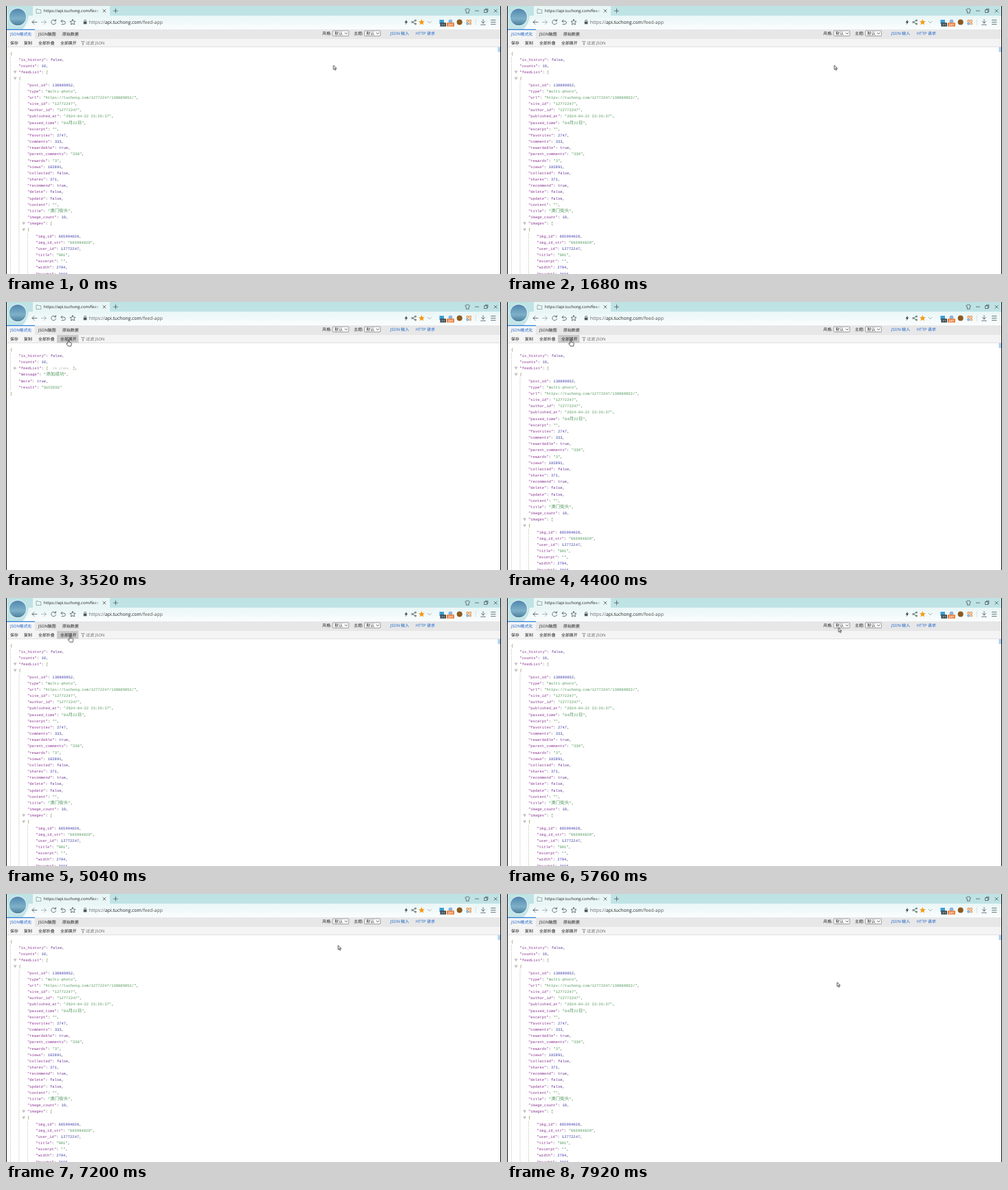
These frames come from a looping animation (720 px wide and 390 px high, 8000 ms). An HTML page:

```html
<!DOCTYPE html>
<html>
<head>
<meta charset="utf-8">
<style>
html, body { margin: 0; width: 100%; height: 100%; overflow: hidden; background: #fff; }
svg { display: block; width: 720px; height: 390px; }
text { font: 5.9px "Open Sans", "Noto Sans CJK SC", sans-serif; fill: #222; text-rendering: geometricPrecision; white-space: pre; }
.url { font-size: 6.8px; }
.blue { fill: #1763c6; }
.line { fill: none; stroke: #4a5658; stroke-width: .8; stroke-linecap: round; stroke-linejoin: round; }
.badge { font-size: 4.4px; font-weight: 600; fill: #fff; text-anchor: middle; }
.json text { font: 5.5px "Liberation Mono", "Noto Sans CJK SC", monospace; fill: #444; }
.json .cjk { font-size: 6.6px; }
.key { fill: #8b3591; }
.str { fill: #4f9659; }
.num { fill: #3d3da8; }
.bool { fill: #682e94; }
.brace { fill: #747a35; }
.guide { stroke: #b9b9b0; stroke-width: .7; stroke-dasharray: 1.5 1; }
.fold { fill: #c8c8c8; stroke: #aaa; stroke-width: .4; }

.full, .short, .hover1, .hover2, .arrow, .hand, .cursor { animation: 8s step-end infinite; }
.full { animation-name: full; }
.short { animation-name: short; }
.hover1 { animation-name: hover1; }
.hover2 { animation-name: hover2; }
.arrow { animation-name: arrow; }
.hand { animation-name: hand; }
.cursor { animation-name: move; animation-timing-function: linear; }
@keyframes full { 0%, 52% { visibility: visible } 33% { visibility: hidden } }
@keyframes short { 0%, 52% { visibility: hidden } 33% { visibility: visible } }
@keyframes hover1 { 0%, 37% { visibility: hidden } 27% { visibility: visible } }
@keyframes hover2 { 0%, 64% { visibility: hidden } 37% { visibility: visible } }
@keyframes arrow { 0%, 64% { visibility: visible } 27% { visibility: hidden } }
@keyframes hand { 0%, 64% { visibility: hidden } 27% { visibility: visible } }
@keyframes move {
  0%, 21% { transform: translate(476.3px, 86.3px) }
  23% { transform: translate(440px, 82px) }
  26% { transform: translate(130px, 60px) }
  28%, 35% { transform: translate(53px, 50.3px) }
  40%, 44% { transform: translate(91px, 55px) }
  52%, 63% { transform: translate(93px, 55px) }
  66% { transform: translate(220px, 56px) }
  69% { transform: translate(440px, 46px) }
  71%, 73% { transform: translate(482.3px, 43.3px) }
  80%, 86% { transform: translate(483.5px, 45px) }
  91% { transform: translate(483px, 82px) }
  97%, 100% { transform: translate(480.2px, 128.4px) }
}
</style>
</head>
<body>
<svg viewBox="0 0 720 390">
  <defs>
    <linearGradient id="bar" x2="0" y2="1">
      <stop stop-color="#e9f6f6"/><stop offset="1" stop-color="#fbfdfd"/>
    </linearGradient>
    <linearGradient id="sky" x2="0" y2="1">
      <stop stop-color="#4f87ae"/><stop offset=".6" stop-color="#7fb0c9"/><stop offset="1" stop-color="#4b7f9c"/>
    </linearGradient>
    <linearGradient id="fade">
      <stop stop-color="#e9f6f6" stop-opacity="0"/><stop offset="1" stop-color="#e9f6f6"/>
    </linearGradient>
  </defs>

  <!-- window and tabs -->
  <path fill="#fff" d="M0 0h720v390H0z"/>
  <path fill="#bfe3e5" d="M0 0h720v14H0z"/>
  <path fill="url(#bar)" d="M0 14h720v20H0z"/>
  <path fill="#e9f6f6" d="M39 0h112v14H39z"/>
  <path fill="#c4e5e7" d="M0 14h33q-1 12-9 20H0z"/>
  <circle cx="17" cy="16" r="13.2" fill="#e3f3f6"/>
  <circle cx="17" cy="16" r="12.2" fill="url(#sky)"/>
  <path class="line" style="stroke:#8b9899" d="M44.500 4.500h2.300l.8 1h3.200v5h-6.300z"/>
  <text x="55" y="9.300">https://api.tuchong.com/feed-</text>
  <path fill="url(#fade)" d="M127 2h9v10h-9z"/><path fill="#e9f6f6" d="M136 2h4v10h-4z"/>
  <path class="line" d="M141 5l4 4m0-4l-4 4M156.500 7h6m-3-3v6"/>
  <path class="line" d="M669 4.500l1.500-.7q.8 1 1.600 0l1.500.7 1 1.500-1.400.7v3.500h-3.800v-3.500l-1.400-.7zM682.500 7h5M696 5.500h3.700v4H696zM697.200 5.500v-1.300h3.700v4h-1.200M710 5l4.200 4.200m0-4.200l-4.200 4.200"/>

  <!-- address row -->
  <path class="line" d="M45 23.500h-7l3-3m-3 3l3 3"/>
  <path class="line" style="stroke:#9aa5a6" d="M51.500 23.500h7l-3-3m3 3l-3 3"/>
  <path class="line" d="M72 21.500a3.400 3.400 0 1 0 .5 3M72.500 19.500v2.300h-2.300M80 22h4a2.200 2.200 0 0 1 0 4.600h-3M82 20l-2 2 2 2"/>
  <path class="line" d="M97 19.500l1.200 2.600 2.800.3-2.100 1.900.6 2.800-2.500-1.400-2.500 1.400.6-2.800-2.100-1.900 2.800-.3z"/>
  <path class="line" d="M113.700 23v-1.300a1.400 1.400 0 0 1 2.800 0V23"/>
  <path fill="#4a5658" d="M112.800 22.700h4.600v3.600h-4.600z"/>
  <text class="url" x="120.800" y="25.900"><tspan fill="#666">https://</tspan>api.tuchong.com<tspan fill="#555">/feed-app</tspan></text>
  <path fill="#333c3e" d="M583 19.800l-3.300 4.200h2l-.9 3.200 3.600-4.400h-2.100z"/>
  <path class="line" d="M595 21.300l-4 2.200 4 2.200"/>
  <g fill="#fff" class="line"><circle cx="595.500" cy="21" r="1"/><circle cx="590.700" cy="23.500" r="1"/><circle cx="595.500" cy="26" r="1"/></g>
  <path fill="#f59a1b" d="M604.500 19l1.300 2.900 3.100.3-2.300 2.100.7 3.100-2.800-1.600-2.800 1.600.7-3.100-2.300-2.100 3.100-.3z"/>
  <path class="line" style="stroke:#8b9899" d="M613.300 22.300l2.500 2.500 2.500-2.500"/>
  <path fill="#3d9fd2" d="M630.500 20h6.500v6h-6.500z"/>
  <path fill="#37474f" d="M631.500 24.300h8.500v5.500h-8.500z"/><text class="badge" x="635.800" y="28.700">11</text>
  <circle cx="646.500" cy="22.500" r="3" fill="#8eb4e4"/>
  <path fill="#ed7b35" d="M641 24.300h11v5.500h-11z"/><text class="badge" x="646.500" y="28.700">OFF</text>
  <circle cx="659.700" cy="23.500" r="4" fill="#8b5a22"/>
  <g fill="none" stroke-width="1"><path stroke="#f08a3c" d="M670 20.500h2.400v2.400H670zM674 24.500h2.400v2.400H674z"/><path stroke="#4a95e6" d="M670 24.500h2.400v2.400H670z"/><path stroke="#f08a3c" d="M674 20.500h2.400v2.400H674z"/></g>
  <path stroke="#cbd6d7" stroke-width=".7" d="M683.500 19v9"/>
  <path class="line" d="M694 19.500v5.500m-2.500-2.500l2.500 2.500 2.500-2.500M690.700 27.300h6.600M705.500 20.500h6.500m-6.500 3h6.500m-6.500 3h6.500"/>

  <!-- viewer toolbar -->
  <path fill="#e7e7e8" d="M0 34h720v14H0z"/>
  <path fill="#f4f4f5" d="M1 34h41v14H1zM0 48h720v11.500H0z"/>
  <path fill="#2d7fe0" d="M1 33.700h41v1.200H1z"/>
  <path fill="#d8d8da" d="M0 59.300h720v.7H0z"/>
  <path class="hover1" fill="#cacacb" d="M42 48h32v11.300H42z"/>
  <path class="hover2" fill="#cacacb" d="M74 48h31.500v11.300H74z"/>
  <text class="blue" x="6" y="43.300">JSON格式化</text>
  <text x="47" y="43.300">JSON脑图</text>
  <text x="82" y="43.300">原始数据</text>
  <text x="460" y="42.300">风格:</text>
  <text x="506" y="42.300">主题:</text>
  <g id="pick">
    <rect x="475.400" y="36" width="23.200" height="7.600" rx=".8" fill="#fff" stroke="#777" stroke-width=".7"/>
    <text x="478" y="42">默认</text>
    <path class="line" style="stroke:#222" d="M493 39l1.700 1.700 1.700-1.700"/>
  </g>
  <use href="#pick" x="46"/>
  <text class="blue" x="559" y="42.300">JSON 输入</text>
  <text class="blue" x="596" y="42.300">HTTP 请求</text>
  <text x="6" y="55.900">保存</text>
  <text x="26" y="55.900">复制</text>
  <text x="47" y="55.900">全部折叠</text>
  <text x="79" y="55.900">全部展开</text>
  <path class="line" style="stroke:#777;stroke-width:.6" d="M109.800 51.500h4.400l-1.700 2.200v2.400l-1 .6v-3z"/>
  <text x="116.300" y="55.900" fill="#666" style="fill:#666">过滤 JSON</text>

  <g class="json full" id="full">
    <path class="guide" d="M6.500 74V390M19 110V390M31.500 330V390"/>
    <path class="fold" d="M11.200 94.500h4l-2 3.600zM11.200 103.700h4l-2 3.600zM23.700 314.700h4l-2 3.600zM23.700 323.900h4l-2 3.600z"/>
    <path fill="#a9cdf0" d="M715.500 60h3.500v7h-3.500z"/>
  </g>
  <g class="json short" id="short">
    <path class="guide" d="M6.500 74V129"/>
    <path class="fold" d="M11.700 94.300v4l3.400-2z"/>
    <text x="68" y="98" style="font-size:4.900px;fill:#bbb">10 items</text>
    <text x="97" y="98.200"><tspan class="brace">]</tspan>,</text>
  </g>

  <path fill="#111" d="M0 0h1v390H0zM719 0h1v390h-1z"/>
  <g class="cursor" stroke-linejoin="round">
    <path class="arrow" fill="#fff" stroke="#111" stroke-width=".7" d="M0 0v6.200l1.500-1.300 1 2.300 1-.4-1-2.300h2z"/>
    <path class="hand" fill="#fff" stroke="#111" stroke-width=".7" d="M-1 5V.8q.8-1.300 1.600 0v2.700l3 .7q.9.400.7 1.600l-.7 3.400H-.6l-2.600-3.300q.4-1.300 1.300-.6z"/>
  </g>
</svg>
<script>
const NS = 'http://www.w3.org/2000/svg';

function span(parent, value, cls) {
  for (const part of value.match(/[\u4e00-\u9fff]+|[^\u4e00-\u9fff]+/g)) {
    const node = document.createElementNS(NS, 'tspan');
    node.setAttribute('class', cls + (part > '\u4e00' ? ' cjk' : ''));
    node.textContent = part;
    parent.append(node);
  }
}

function kind(value) {
  return /^"/.test(value) ? 'str' : /^\d/.test(value) ? 'num' : /^[a-z]/.test(value) ? 'bool' : 'brace';
}

// Each row is "depth|key|value"; an empty key is a lone bracket.
function print(id, rows) {
  rows.trim().split('\n').forEach((row, i) => {
    const [depth, key, value] = row.trim().split('|');
    const line = document.createElementNS(NS, 'text');
    line.setAttribute('x', 6 + depth * 12.5);
    line.setAttribute('y', 70.7 + i * 9.17);
    if (key) {
      span(line, `"${key}"`, 'key');
      span(line, ': ', '');
    }
    const body = value.replace(/,$/, '');
    span(line, body, kind(body));
    if (body !== value) span(line, ',', '');
    document.getElementById(id).append(line);
  });
}

print('full', `
  0||{
  1|is_history|false,
  1|counts|10,
  1|feedList|[
  1||{
  2|post_id|130889852,
  2|type|"multi-photo",
  2|url|"https://tuchong.com/12772247/130889852/",
  2|site_id|"12772247",
  2|author_id|"12772247",
  2|published_at|"2024-04-22 23:26:37",
  2|passed_time|"04月22日",
  2|excerpt|"",
  2|favorites|2747,
  2|comments|333,
  2|rewardable|true,
  2|parent_comments|"330",
  2|rewards|"3",
  2|views|182891,
  2|collected|false,
  2|shares|371,
  2|recommend|true,
  2|delete|false,
  2|update|false,
  2|content|"",
  2|title|"澳门街头",
  2|image_count|10,
  2|images|[
  2||{
  3|img_id|665994020,
  3|img_id_str|"665994020",
  3|user_id|12772247,
  3|title|"001",
  3|excerpt|"",
  3|width|2704,
  3|height|3605,`);

print('short', `
  0||{
  1|is_history|false,
  1|counts|10,
  1|feedList|[
  1|message|"添加成功",
  1|more|true,
  1|result|"SUCCESS"
  0||}`);
</script>
</body>
</html>
```
